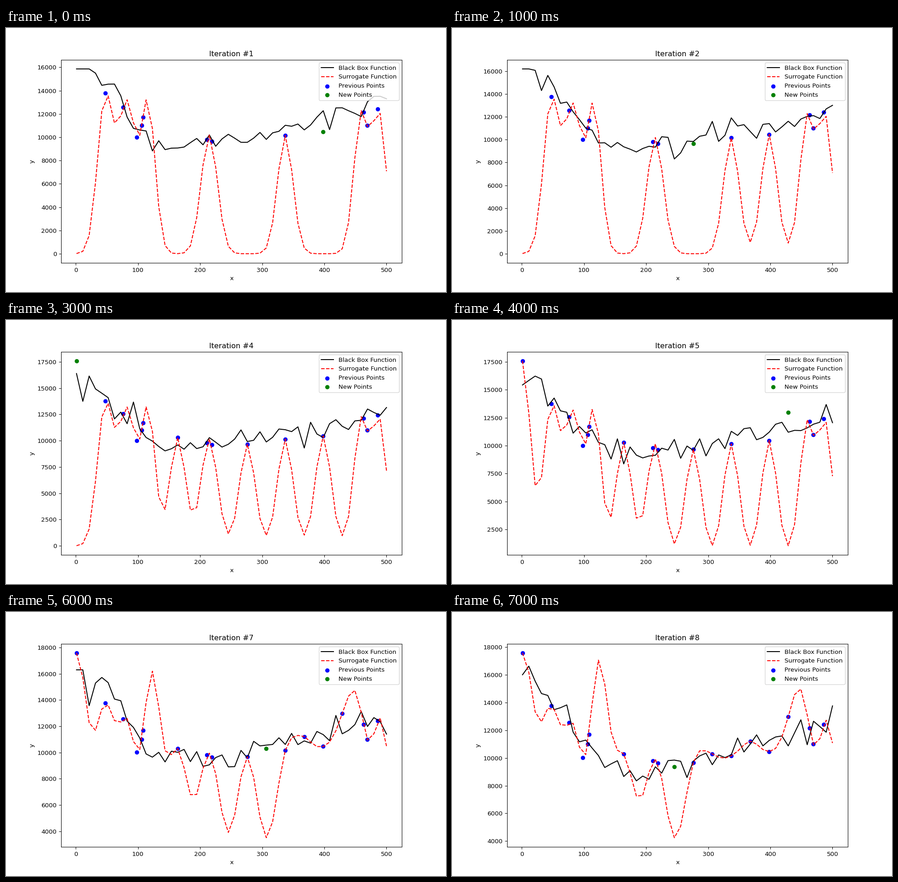
These frames come from a looping animation (966 by 580 pixels, 8 s). A matplotlib script:

```python
import numpy as np
import matplotlib.pyplot as plt
from matplotlib.animation import FuncAnimation

W, H, DPI = 966, 580, 96.6
GRID = np.linspace(1, 500, 50)

# Sampled points: the first eleven are given, then one is added per iteration.
START_X = [47, 76, 98, 106, 108, 211, 219, 337, 463, 469, 486]
START_Y = [13770, 12560, 10010, 11000, 11700, 9800, 9640, 10155, 12150, 11000, 12415]
NEW_K = [39, 27, 16, 0, 42, 36, 30, 24]
NEW_Y = [10460, 9670, 10300, 17590, 12970, 11220, 10300, 9350]
PX = np.concatenate([START_X, GRID[NEW_K]])
PY = np.array(START_Y + NEW_Y, float)

# Per iteration: fitted kernel length and highest black box value.
LENGTH = [12.41, 12.42, 12.44, 12.48, 12.6, 15.6, 16.8, 17.7]
PEAK = [15860, 16200, 16480, 16390, 16230, 16310, 16300, 16630]


def black_box(i):
    """Noisy evaluation: a falling hump on a rising line."""
    trend = 7200 + 10.4 * GRID + 8800 * np.exp(-(GRID / 95) ** 2)
    noise = np.random.default_rng(i).normal(0, 0.055, GRID.size)
    run = np.minimum(trend * (1 + noise), PEAK[i])
    run[run.argmax()] = PEAK[i]
    return run


def kernel(a, b, length):
    return np.exp(-np.subtract.outer(a, b) ** 2 / (2 * length ** 2))


def surrogate(x, y, length):
    """Mean of a zero-prior Gaussian process through the points."""
    k = kernel(x, x, length) + 1e-10 * np.eye(x.size)
    return kernel(GRID, x, length) @ np.linalg.solve(k, y)


# The small margin keeps the pixel size from rounding down.
fig, ax = plt.subplots(figsize=((W + 0.01) / DPI, (H + 0.01) / DPI), dpi=DPI)
fig.subplots_adjust(left=0.125, right=0.9, bottom=0.11, top=0.88)


def draw(i):
    n = len(START_X) + i
    box = black_box(i)
    fit = surrogate(PX[:n], PY[:n], LENGTH[i])

    ax.clear()
    ax.plot(GRID, box, color="black", label="Black Box Function")
    ax.plot(GRID, fit, color="red", linestyle="--", label="Surrogate Function")
    ax.scatter(PX[:n], PY[:n], color="blue", label="Previous Points")
    ax.scatter(PX[n], PY[n], color="green", label="New Points")

    values = np.concatenate([box, fit, PY[:n + 1]])
    low, high = values.min(), values.max()
    pad = 0.05 * (high - low)
    ax.set_ylim(low - pad, high + pad)
    ax.set_xlim(-23.95, 524.95)
    ax.set_title(f"Iteration #{i + 1}")
    ax.set_xlabel("x")
    ax.set_ylabel("y")
    ax.legend(loc="upper right")
    return ax.get_children()


anim = FuncAnimation(fig, draw, frames=len(NEW_K), interval=1000,
                     repeat=True, repeat_delay=0, blit=False)
plt.show()
```
